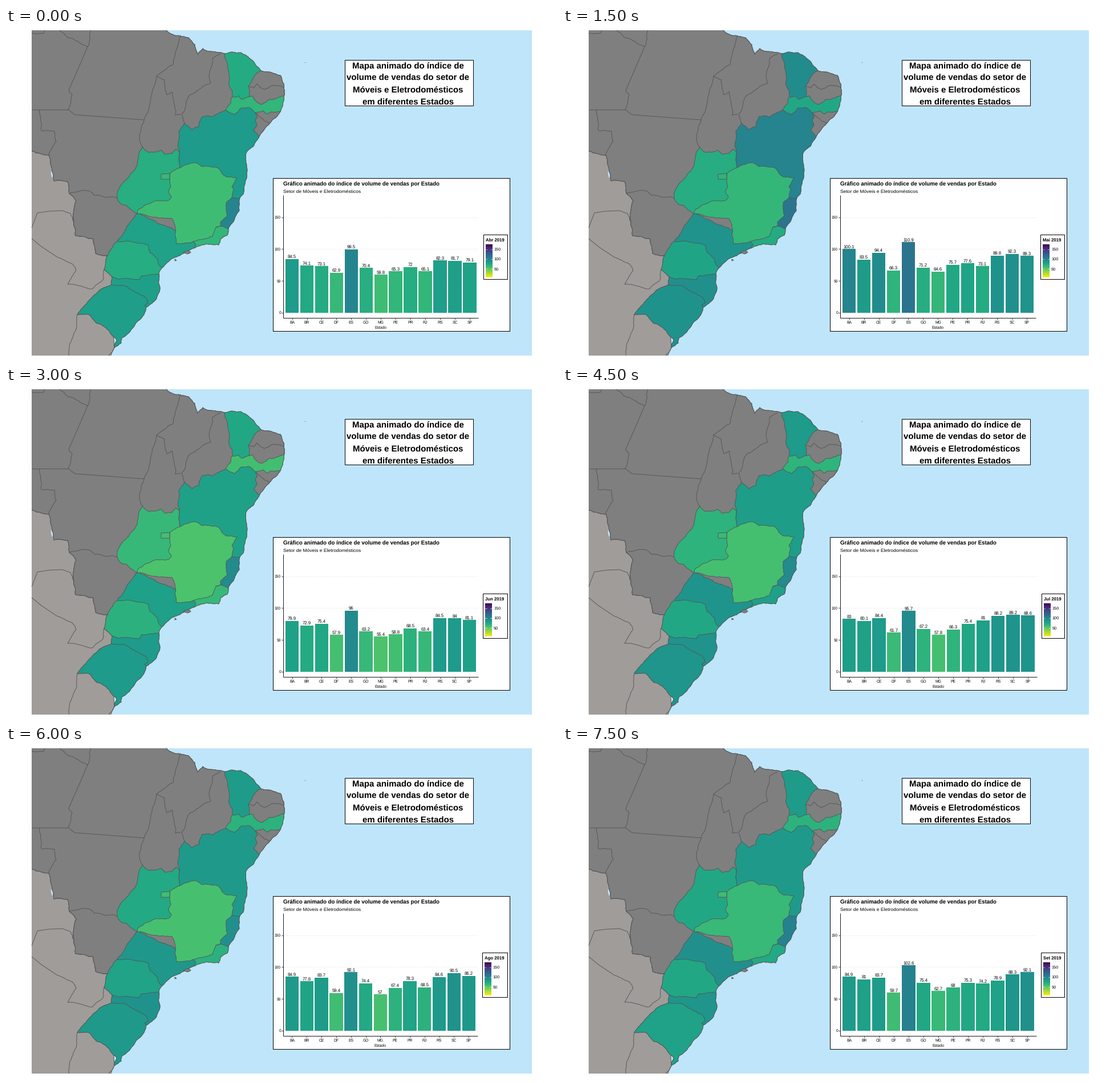
Animation of 966x580 px, one loop 8 s. Source, as a matplotlib script:

```python
import math
import random

import matplotlib.pyplot as plt
import numpy as np
from matplotlib.animation import FuncAnimation
from matplotlib.patches import Polygon, Rectangle

W, H, DPI = 966, 580, 100
PT = 72 / DPI
SEA, NO_DATA, ABROAD, BORDER = "#BFE5FA", "#7F7F7F", "#A09C9A", "#555555"
V_MIN, V_MAX = 7.5, 176

CODES = "BA BR CE DF ES GO MG PE PR RJ RS SC SP".split()
SALES = {
    "Abr": [84.5, 74.1, 73.1, 62.9, 99.5, 70.4, 59.8, 65.3, 72, 65.1, 82.3, 81.7, 79.1],
    "Mai": [100.1, 83.5, 94.4, 66.3, 110.9, 71.2, 64.6, 75.7, 77.6, 73.1, 89.8, 92.3, 89.3],
    "Jun": [79.9, 72.9, 75.4, 57.9, 96, 63.2, 55.4, 58.8, 68.5, 63.4, 84.5, 84, 81.1],
    "Jul": [83, 80.1, 84.4, 61.7, 95.7, 67.2, 57.8, 66.3, 75.4, 81, 88.2, 89.2, 88.6],
    "Ago": [84.9, 77.8, 83.7, 59.4, 92.1, 74.4, 57, 67.4, 78.3, 68.5, 84.6, 90.5, 86.2],
    "Set": [84.9, 81, 83.7, 59.7, 102.6, 75.4, 62.7, 68, 75.3, 74.2, 78.9, 88.3, 92.1],
}
MONTHS = list(SALES)

plt.rcParams["text.hinting"] = "none"
fig = plt.figure(figsize=(W / DPI, H / DPI), dpi=DPI, facecolor="white")
ax = fig.add_axes([0, 0, 1, 1])
ax.axis("off")


def points(*xy):
    return list(zip(xy[::2], xy[1::2]))


def rough(pts, rng, amount=0.09):
    """Break each segment by seeded midpoint displacement."""
    out = pts[:1]
    for (x0, y0), (x1, y1) in zip(pts, pts[1:]):
        dx, dy = x1 - x0, y1 - y0
        size = math.hypot(dx, dy)
        if size > 4:
            off = rng.uniform(-amount, amount) * min(1, 18 / size)
            mid = ((x0 + x1) / 2 - dy * off, (y0 + y1) / 2 + dx * off)
            out += rough([(x0, y0), mid, (x1, y1)], rng, amount)[1:]
        else:
            out.append((x1, y1))
    return out


def region(pts, color, clip=None, amount=0.09, edge=BORDER, **kw):
    pts = rough(pts + pts[:1], random.Random(len(pts)), amount)
    patch = ax.add_patch(Polygon(pts, fc=color, ec=edge, lw=0.9 * PT, joinstyle="round", **kw))
    if clip:
        patch.set_clip_path(clip)
    return patch


def line(pts, color=BORDER, width=0.9, **kw):
    xs, ys = zip(*pts)
    return ax.plot(xs, ys, color=color, lw=width * PT, solid_capstyle="butt", **kw)[0]


def box(x0, y0, x1, y1, color="white", edge="black", **kw):
    return ax.add_patch(Rectangle((x0, y0), x1 - x0, y1 - y0, fc=color, ec=edge, lw=PT, **kw))


def label(x, y, text, px, ha="center", bold=False):
    return ax.text(x, y + 0.36 * px, text, fontsize=px * PT, ha=ha, va="baseline",
                   family="Liberation Sans", weight="bold" if bold else "normal", zorder=6)


def shade(value):
    return plt.cm.viridis((V_MAX - value) / (V_MAX - V_MIN))


# ---- land: the outline clips the states, and later states cover earlier ones ----
panel = box(45, 4, 922, 574, SEA, "none")
region(points(30, 150, 200, 200, 200, 440, 186, 500, 190, 560, 186, 568, 178, 590, 30, 590),
       ABROAD, panel, 0)
region(points(79, 250, 83, 257, 84, 268, 80, 261), SEA, edge="none")

outline = points(
    268, -4, 283, 6, 296, 13, 320, 17, 331, 29, 336, 46, 345, 36, 357, 41, 383, 45, 396, 42,
    412, 43, 427, 53, 447, 75, 459, 77, 481, 83, 487, 98, 487, 121, 482, 144, 457, 172, 444, 190,
    434, 207, 421, 219, 422, 263, 416, 291, 410, 298, 409, 320, 399, 339, 390, 352, 388, 363,
    376, 370, 373, 380, 344, 380, 328, 386, 296, 402, 274, 420, 268, 431, 270, 455, 264, 474,
    246, 489, 242, 502, 222, 526, 203, 543, 202, 552, 190, 560, 194, 546, 176, 526, 158, 517,
    145, 502, 125, 502, 145, 478, 166, 458, 185, 450, 186, 436, 172, 423, 178, 399, 157, 395,
    153, 370, 122, 364, 118, 325, 123, 304, 111, 290, 108, 269, 84, 268, 75, 223, 30, 212, 30, -4)
brazil = region(outline, NO_DATA, panel)

SHAPES = {
    "CE": points(383, 30, 470, 70, 447, 75, 436, 83, 431, 93, 425, 102, 427, 109, 425, 125,
                 396, 125, 397, 111, 391, 100, 391, 80, 384, 53),
    "BA": points(304, 217, 301, 207, 303, 181, 313, 167, 326, 178, 338, 173, 344, 155, 362, 156,
                 385, 144, 430, 135, 437, 148, 441, 156, 437, 162, 440, 170, 434, 180, 444, 190,
                 480, 215, 460, 320, 380, 310, 300, 270),
    "ES": points(380, 303, 396, 297, 410, 298, 440, 300, 440, 370, 360, 350),
    "RJ": points(376, 347, 390, 352, 410, 355, 400, 400, 320, 400, 328, 370, 350, 355),
    "SP": points(230, 325, 214, 345, 204, 363, 195, 374, 230, 400, 270, 430, 320, 420, 328, 388,
                 333, 380, 328, 374, 310, 360),
    "GO": points(239, 208, 250, 218, 272, 214, 278, 221, 291, 220, 298, 212, 304, 217, 303, 232,
                 305, 245, 320, 260, 300, 310, 230, 325, 212, 311, 201, 308, 195, 298, 196, 286,
                 206, 270, 221, 253, 230, 241, 232, 226),
    "MG": points(305, 245, 332, 236, 344, 243, 373, 246, 386, 261, 405, 263, 396, 278, 399, 284,
                 396, 297, 386, 306, 388, 328, 376, 340, 376, 347, 368, 349, 362, 365, 328, 374,
                 299, 378, 296, 345, 291, 334, 268, 333, 230, 325, 232, 318, 259, 304, 285, 302,
                 290, 296, 285, 286, 289, 278, 287, 255),
    "PE": points(396, 121, 408, 119, 413, 125, 432, 119, 440, 130, 448, 134, 456, 130, 461, 125,
                 470, 125, 500, 116, 495, 144, 464, 147, 458, 151, 451, 145, 437, 149, 425, 139,
                 413, 140, 401, 152, 385, 144, 394, 132),
    "PR": points(195, 374, 222, 375, 250, 381, 252, 393, 266, 405, 268, 415, 274, 420, 300, 430,
                 268, 445, 160, 445, 166, 402, 178, 399, 189, 379),
    "SC": points(160, 434, 186, 436, 198, 440, 234, 441, 238, 434, 268, 431, 300, 435, 290, 485,
                 246, 489, 200, 460, 170, 450),
    "RS": points(185, 450, 212, 453, 232, 465, 247, 475, 249, 482, 243, 486, 246, 489, 280, 500,
                 220, 590, 160, 570, 100, 505, 150, 450),
    "DF": points(272, 256, 287, 255, 287, 265, 272, 265),
}
states = {code: region(pts, NO_DATA, brazil, 0 if code == "DF" else 0.09)
          for code, pts in SHAPES.items()}
region(outline, "none", panel)

wiggly = [
    points(45, 9, 66, 9, 68, 4),
    points(94, 4, 107, 16, 118, 19, 143, 33, 147, 20, 149, 4),
    points(110, 109, 116, 117, 109, 143, 121, 152),
    points(58, 143, 62, 180, 85, 181, 88, 199, 75, 223),
    points(239, 208, 234, 196, 242, 161, 251, 138, 264, 84, 293, 64, 306, 13),
    points(264, 84, 278, 91, 282, 117, 291, 112, 297, 153, 306, 151),
    points(376, 46, 362, 53, 356, 85, 359, 96, 322, 118, 308, 152, 313, 167),
    points(111, 290, 125, 287, 144, 285, 155, 293, 195, 298),
    points(425, 102, 434, 105, 440, 98, 453, 108, 466, 101, 487, 104),
    points(437, 148, 446, 157, 462, 167),
    points(99, 320, 113, 325, 118, 339),
    points(86, 399, 117, 414, 123, 424, 108, 449, 152, 457, 170, 441, 172, 423),
    points(125, 502, 122, 530, 111, 560, 110, 574),
    points(190, 560, 186, 568, 180, 574),
]
plain = [
    points(143, 33, 128, 68, 110, 109),
    points(45, 143, 109, 143),
    points(121, 152, 242, 161),
    points(45, 350, 55, 324, 75, 321, 99, 320),
    points(45, 369, 62, 383, 86, 399),
]
for k, pts in enumerate(wiggly):
    line(rough(pts, random.Random(k)))
for pts in plain:
    line(pts)
region(points(311, 393, 319, 390, 324, 393, 318, 396), NO_DATA)
region(points(296, 405, 299, 407, 296, 408), NO_DATA)
box(524, 60, 525, 61, "#444444", "none")

# ---- heading ----
box(594, 56, 819, 136, zorder=4)
heading = ["Mapa animado do índice de", "volume de vendas do setor de",
           "Móveis e Eletrodomésticos", "em diferentes Estados"]
for k, text in enumerate(heading):
    label(704.6, 65.2 + 21.3 * k, text, 15.05, bold=True)

# ---- bar chart ----
LEFT, BASE, UNIT = 486, 499, 1.116
box(468, 263, 883, 531, zorder=4)
label(485.6, 272.2, "Gráfico animado do índice de volume de vendas por Estado", 9.6, "left", True)
label(485.6, 285.4, "Setor de Móveis e Eletrodomésticos", 8.5, "left")
line(points(LEFT, 293, LEFT, 508), "black", zorder=5)
x_axis = line(points(LEFT, 508, 828, 508), "black", zorder=5)
grid = []
for value in range(0, 151, 50):
    y = BASE - value * UNIT
    label(482, y, str(value), 6.6, "right")
    line(points(483, y, LEFT, y), "#333333", zorder=5)
    grid.append(line(points(LEFT, y, 828, y), "#E4E4E4", 0.8, ls=(0, (2, 2)), zorder=4.5))

bars = [box(0, BASE, 1, BASE, edge="none", zorder=5) for _ in CODES]
ticks = [line(points(0, 508, 0, 511), "#333333", zorder=5) for _ in CODES]
names = [label(0, 515.4, code, 6.8) for code in CODES]
numbers = [label(0, 0, "", 7.8) for _ in CODES]
x_title = label(657, 524, "Estado", 6.8)

# ---- legend: right edge fixed, width follows the month's name ----
RIGHT, TOP, RAMP_H = 879, 379, 58
frame_box = box(836, 362, RIGHT, 440, zorder=4.5)
month = label(840, 371.6, "", 7.8, "left", True)
ramp = plt.cm.viridis(np.linspace(0, 1, 100))[:, None, :3]
strip = ax.imshow(ramp, extent=(840, 851, TOP + RAMP_H, TOP), aspect="auto", zorder=5)
keys = []
for value in (150, 100, 50):
    y = TOP + RAMP_H * (V_MAX - value) / (V_MAX - V_MIN)
    marks = [line(points(0, y, 2, y), "white", 0.7, zorder=6) for _ in range(2)]
    keys.append((label(856, y - 0.4, str(value), 7.4, "left"), marks))


def update(i):
    name = MONTHS[i // 3]
    month.set_text(name + " 2019")
    left = RIGHT - 9.5 - month.get_window_extent().width
    right = left - 8.3
    step = (right - LEFT) / (len(CODES) + 0.2)

    for k, (code, value) in enumerate(zip(CODES, SALES[name])):
        x, tall, color = LEFT + step * (k + 0.6), value * UNIT, shade(value)
        bars[k].set_bounds(x - 0.45 * step, BASE - tall, 0.9 * step, tall)
        bars[k].set_facecolor(color)
        ticks[k].set_xdata([x, x])
        names[k].set_x(x)
        numbers[k].set_position((x, BASE - tall - 1.6))
        numbers[k].set_text(f"{value:g}")
        if code in states:
            states[code].set_facecolor(color)
    for rule in [x_axis, *grid]:
        rule.set_xdata([LEFT, right])
    x_title.set_x((LEFT + right) / 2)

    frame_box.set_bounds(left, 362, RIGHT - left, 78)
    x0, x1 = left + 4, left + 15.3
    month.set_x(x0)
    strip.set_extent((x0, x1, TOP + RAMP_H, TOP))
    for text, (a, b) in keys:
        text.set_x(x1 + 3.5)
        a.set_xdata([x0, x0 + 2.3])
        b.set_xdata([x1 - 2.3, x1])
    ax.set_xlim(0, W)
    ax.set_ylim(H, 0)
    return []


anim = FuncAnimation(fig, update, frames=16, interval=500, repeat=True, repeat_delay=0,
                     init_func=lambda: update(0))
plt.show()
```
